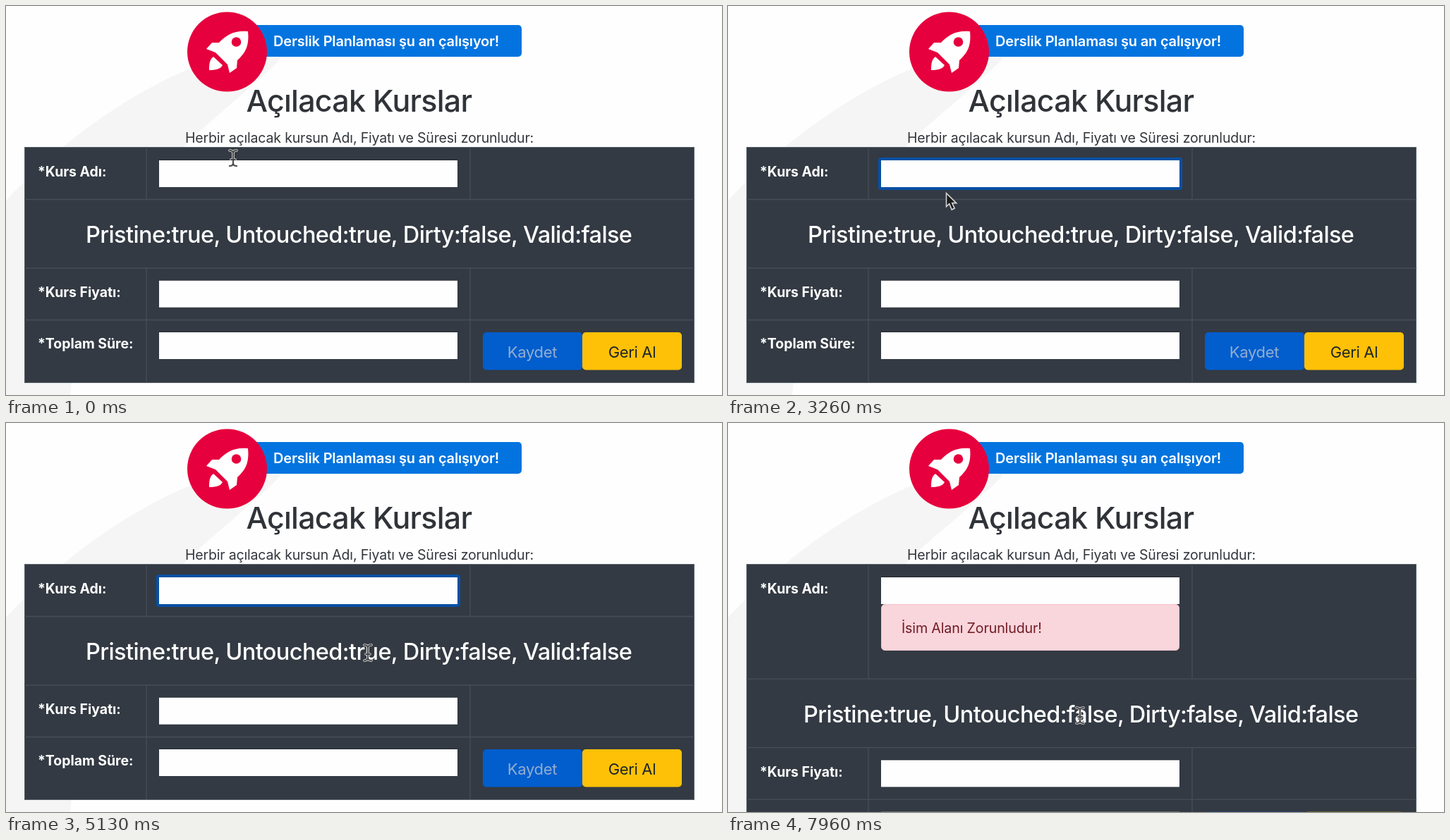
An HTML page that plays this animation: 1015x552 px, repeating every 8000 ms.

```html
<!DOCTYPE html>
<html lang="tr">
<head>
<meta charset="utf-8">
<title>Kurs formu</title>
<style>
  html, body { margin: 0; width: 100%; height: 100%; overflow: hidden; background: #fefefe; }
  svg { display: block; font: 19.5px Inter, "Open Sans", sans-serif; font-optical-sizing: none; }
  text { letter-spacing: -.009em; }
  .mid { text-anchor: middle; }
  .title { font-size: 43px; font-weight: 500; letter-spacing: -.0175em; fill: #303338; }
  .badge { font-size: 20px; font-weight: 600; fill: #fff; }
  .label { font-weight: 700; letter-spacing: -.003em; fill: #fff; }
  .state { font-size: 32.5px; font-weight: 500; letter-spacing: -.019em; fill: #fff; }
  .button { font-size: 22px; letter-spacing: -.015em; }
  .line { fill: none; stroke: #464e57; stroke-width: 1.3; }
  .field { fill: #fefefe; }
  .edge { fill: #22282e; }
</style>
</head>
<body>
<svg width="1015" height="552" viewBox="0 0 1015 552">
  <defs>
    <g id="input">
      <rect class="edge" x="217" y="-1" width="423" height="2"/>
      <rect class="field" x="217" width="423" height="38"/>
    </g>
    <path id="beam" d="M-5 -11Q0 -11 0 -7V7Q0 11 -5 11M5 -11Q0 -11 0 -7M0 7Q0 11 5 11M-3 2H3"/>
  </defs>

  <path fill="#f5f5f5" d="M0 276C65 205 165 127 270 85L390 72C385 82 365 98 345 116C310 148 278 172 252 200C170 290 105 400 91 552H0Z"/>
  <rect x="313" y="27" width="418" height="45" rx="5" fill="#0374df"/>
  <circle cx="313.5" cy="65" r="56.5" fill="#e6003d"/>
  <g fill="#fff">
    <path d="M343 36C345 56 340 66 328 77L327 88L317 95L314 83L297 66L284 61L292 52L302 52C312 41 324 34 343 36Z"/>
    <path d="M294 72C288 76 288 84 288 91C296 91 304 90 307 84Z"/>
  </g>
  <circle cx="326.5" cy="51" r="6.8" fill="#e6003d"/>
  <text class="badge" x="379" y="56.5">Derslik Planlaması şu an çalışıyor!</text>
  <text class="title mid" x="500.5" y="150">Açılacak Kurslar</text>
  <text class="mid" x="501" y="194" fill="#33373c">Herbir açılacak kursun Adı, Fiyatı ve Süresi zorunludur:</text>

  <rect id="table" x="26.5" y="200.5" width="949" height="334" fill="#333a43" stroke="#5b666d"/>
  <path id="columns" class="line"/>
  <text class="label" x="45" y="242">*Kurs Adı:</text>
  <use href="#input" y="219"/>
  <g id="focus">
    <rect x="215" y="217" width="427" height="42" rx="2" fill="#fefefe" stroke="#0850a4" stroke-width="4"/>
    <rect id="caret" x="221" y="223" width="1" height="30" fill="#111"/>
  </g>
  <g id="alert">
    <rect x="217.5" y="257.5" width="422" height="65" rx="5" fill="#f9d5dc" stroke="#f3c3ca"/>
    <text x="246" y="298" fill="#721c24" style="font-size:19.7px">İsim Alanı Zorunludur!</text>
  </g>

  <g id="lower">
    <path class="line" d="M26 274.5H976M26 372H976M26 445.5H976M199 372V534M658 372V534"/>
    <text id="state" class="state mid" x="500.2" y="336.3"></text>
    <text class="label" x="45" y="413">*Kurs Fiyatı:</text>
    <use href="#input" y="389.7"/>
    <text class="label" x="45" y="486">*Toplam Süre:</text>
    <use href="#input" y="463"/>
    <rect x="676" y="463" width="141" height="53.5" rx="5" fill="#025dcd"/>
    <rect x="817" y="463" width="141" height="53.5" rx="5" fill="#ffc107"/>
    <text class="button mid" x="746" y="498.5" fill="#92aed2">Kaydet</text>
    <text class="button mid" x="887.5" y="498.5" fill="#212529">Geri Al</text>
  </g>

  <g id="textCursor" fill="none" stroke-linecap="round">
    <use href="#beam" stroke="#dcdcdc" stroke-width="3.6"/>
    <use href="#beam" stroke="#444" stroke-width="1.8"/>
  </g>
  <path id="arrow" d="M.6 .6V19.5L4.8 15.5L8.3 24L12.3 22L8.8 14.5H14.8Z" fill="#1b1b1b" stroke="#d4d4d4" stroke-width="1.6"/>
</svg>
<script>
const LOOP = 8000, FOCUS = 600, BLUR = 6760, BLINK = 500, SHIFT = 88.7;
const $ = id => document.getElementById(id);
const show = (id, on) => $(id).setAttribute('display', on ? 'inline' : 'none');

// Pointer stops: time, x, y
const stops = [
  [0, 322, 216], [30, 322, 216], [300, 310.5, 233], [2100, 310.5, 233],
  [2300, 315.5, 246], [2500, 315.5, 246], [2960, 311, 260], [3100, 311, 260],
  [3760, 297, 294], [3960, 297, 294], [4100, 297, 299], [4500, 558, 329],
  [4760, 537, 327], [4800, 537, 327], [5130, 513, 326], [5800, 513, 326],
  [6130, 903, 240], [7360, 903, 240], [7800, 485, 415], [7960, 499, 415], [LOOP, 499, 415]
];

function pointerAt(t) {
  const i = stops.findIndex(s => s[0] > t);
  const [t0, x0, y0] = stops[i - 1], [t1, x1, y1] = stops[i];
  const u = (t - t0) / (t1 - t0), k = u * u * (3 - 2 * u);
  return [x0 + (x1 - x0) * k, y0 + (y1 - y0) * k];
}

function draw(now) {
  const t = now % LOOP, touched = t >= BLUR, shift = touched ? SHIFT : 0;
  show('focus', t >= FOCUS && !touched);
  show('caret', t >= FOCUS && !touched && Math.floor((t - FOCUS) / BLINK) % 2 === 0);
  show('alert', touched);
  $('table').setAttribute('height', 334 + shift);
  $('columns').setAttribute('d', `M199 200V${274 + shift}M658 200V${274 + shift}`);
  $('lower').setAttribute('transform', `translate(0 ${shift})`);
  $('state').textContent = `Pristine:true, Untouched:${!touched}, Dirty:false, Valid:false`;

  const [x, y] = pointerAt(t);
  const overInput = x > 215 && x < 642 && y > 212 && y < 259;
  const overState = y > 292 + shift && y < 354 + shift;
  const overText = overInput || overState;
  show('textCursor', overText);
  show('arrow', !overText);
  $(overText ? 'textCursor' : 'arrow').setAttribute('transform', `translate(${x} ${y})`);
}

const start = performance.now();
function tick() {
  draw(performance.now() - start);
  requestAnimationFrame(tick);
}
tick();
</script>
</body>
</html>
```
